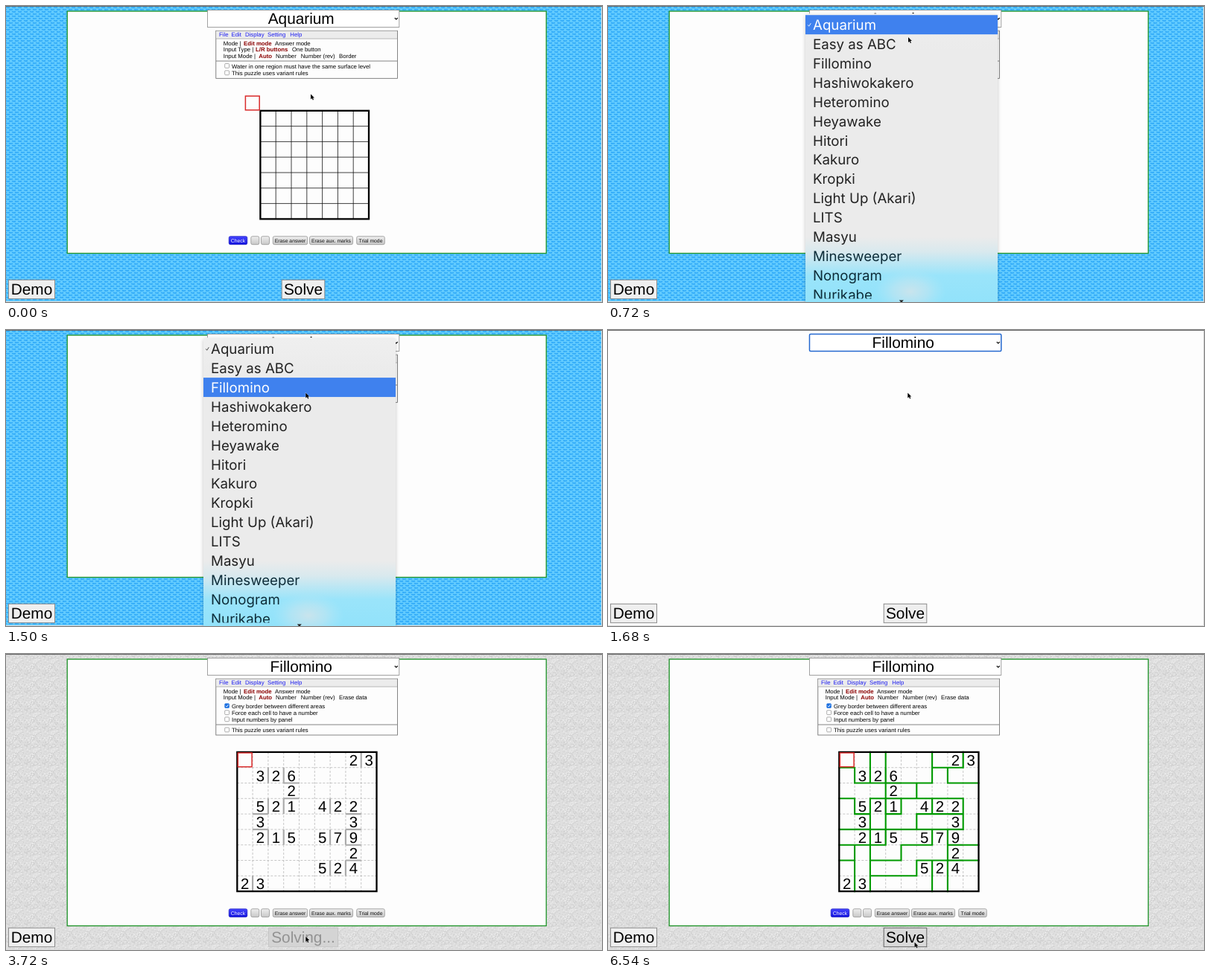
Recreate the animation shown at these times as an HTML page. Size 800x398 px, loop 6.6 s.

```html
<!DOCTYPE html>
<html lang="en">
<head>
<meta charset="utf-8">
<title>Puzzle solver demo</title>
<style>
  html, body { margin: 0; width: 100%; height: 100%; overflow: hidden; background: #fdfdfd; }
  svg { display: block; width: 800px; height: 398px; }
  text { font-family: "Liberation Sans", Arial, sans-serif; text-rendering: geometricPrecision; white-space: pre; }
  .big { font-size: 20.8px; text-anchor: middle; }
  .small { font-size: 7.8px; }
  .link { fill: #1a1af0; }
  .on { fill: #8b0000; font-weight: bold; }
  .tool { font-size: 6.8px; text-anchor: middle; }
  .digit { font-size: 20.4px; text-anchor: middle; }
  .item { font: 18.7px Inter, Roboto, sans-serif; }
</style>
</head>
<body>
<svg id="stage" viewBox="0 0 800 398" xmlns="http://www.w3.org/2000/svg"></svg>
<script>
const LOOP = 6600, CELL = 20.8, ROW = 25.95, LIST_TOP = 12.2;
const OPEN = 480, CHOSEN = 1620, LOADED = 1860, PRESS = 2220, DEMO = 2340, SOLVING = 3660, SOLVED = 4860;
const PUZZLES = ['Aquarium', 'Easy as ABC', 'Fillomino', 'Hashiwokakero', 'Heteromino', 'Heyawake', 'Hitori',
  'Kakuro', 'Kropki', 'Light Up (Akari)', 'LITS', 'Masyu', 'Minesweeper', 'Nonogram', 'Nurikabe'];
const CLUES = ['.......23', '.326.....', '...2.....', '.521.422.', '.3.....3.', '.215.579.', '.......2.', '.....524.', '23.......'];
const REGIONS = ['AABCCCDDE', 'FABCCCGEE', 'FFFHHGGGG', 'IFJKLLMMG', 'IIJLLNNNG', 'OOPQQQRGG', 'TUQQRRRVV', 'WURRRXYZZ', 'WUXXXXYZZ'];

// Pointer stops: time, x, y
const POINTER = [
  [0, 409, 118.5], [420, 404, 19], [570, 404, 21], [720, 403, 42], [1380, 402.3, 84.5], [1740, 402.3, 84.5],
  [2180, 44.5, 385.5], [2800, 44.5, 385.5], [3240, 402.3, 380], [4900, 402.3, 380], [5460, 464, 336],
  [6140, 450, 277], [6270, 450, 277], [6530, 411.5, 387.5]
];

const attrs = o => Object.entries(o).map(([k, v]) => ` ${k}="${v}"`).join('');
const el = (tag, o, inner = '') => `<${tag}${attrs(o)}>${inner}</${tag}>`;
const rect = (x, y, width, height, fill, more = {}) => el('rect', { x, y, width, height, fill, ...more });
const path = (d, stroke, width, more = {}) => el('path', { d, stroke, 'stroke-width': width, fill: 'none', ...more });
const text = (cls, x, y, s, more = {}) => el('text', { class: cls, x, y, ...more }, s);
const group = (id, inner, more = {}) => el('g', { id, ...more }, inner);

function speckles() {
  let seed = 7, out = '';
  const rnd = n => (seed = seed * 16807 % 2147483647) % (n * 10) / 10;
  for (let i = 0; i < 150; i++) {
    out += rect(rnd(23), rnd(23), 1.6, 1, ['#cbcbcb', '#d3d3d3', '#f0f0f0'][i % 3]);
  }
  return out;
}

const defs = `<defs>
  <pattern id="waves" width="8" height="6" patternUnits="userSpaceOnUse">${
    rect(0, 0, 8, 6, '#62cbff') + path('M0 1.5q2.5 1 5 0M4 4.5q2.5 1 5 0M-4 4.5q2.5 1 5 0', '#2ca8f8', 1.5)}</pattern>
  <pattern id="stone" width="24" height="24" patternUnits="userSpaceOnUse">${rect(0, 0, 24, 24, '#dfdfdf') + speckles()}</pattern>
  <linearGradient id="glass" x1="0" y1="0" x2="0" y2="1">
    <stop offset="0" stop-color="#efefef"/><stop offset=".12" stop-color="#ebebeb"/><stop offset=".75" stop-color="#ebebeb"/>
    <stop offset=".8" stop-color="#d9e9ee"/><stop offset=".88" stop-color="#9ae4fa"/><stop offset="1" stop-color="#8fe2fb"/>
  </linearGradient>
  <radialGradient id="haze"><stop offset="0" stop-color="#d2e4ea" stop-opacity=".85"/><stop offset=".5" stop-color="#cbe5ee" stop-opacity=".5"/><stop offset="1" stop-color="#b5e8f7" stop-opacity="0"/></radialGradient>
  <linearGradient id="grey" x1="0" y1="0" x2="0" y2="1"><stop offset="0" stop-color="#eee"/><stop offset="1" stop-color="#c8c8c8"/></linearGradient>
  <linearGradient id="blue" x1="0" y1="0" x2="0" y2="1"><stop offset="0" stop-color="#4646ff"/><stop offset="1" stop-color="#0d0ddc"/></linearGradient>
  <filter id="shade" x="-10%" y="-10%" width="120%" height="120%"><feDropShadow dx="0" dy="2" stdDeviation="2.5" flood-opacity=".22"/></filter>
  <clipPath id="items"><rect x="265" y="10" width="258" height="383.5"/></clipPath>
</defs>`;

const board = (bottom, fill) => rect(0, 1, 800, 397, fill) +
  rect(82.2, 7, 643, bottom - 7.5, '#fdfdfd', { stroke: '#1c9226', 'stroke-width': 1.3 });

const row = (y, items) => items.map(([x, s, cls = '']) => text('small ' + cls, x, y, s)).join('');

const check = (y, label, on) =>
  rect(293.7, y - 6, 5.8, 5.8, on ? '#1a6fe0' : '#fff', { rx: 1, stroke: on ? '#1a6fe0' : '#777', 'stroke-width': .6 }) +
  (on ? path(`M295 ${y - 3}l1.3 1.4 2.1-3`, '#fff', .9) : '') + text('small', 303, y, label);

const panel = (bottom, separator, inner) =>
  rect(281.8, 33.3, 243.6, bottom - 33.5, '#fdfdfd', { stroke: '#666', 'stroke-width': .8 }) +
  rect(282.2, 33.7, 242.8, 10, '#ececec') + path('M282 44H525', '#999', .7) +
  path(`M282 ${separator}H525`, '#777', .9) +
  row(41.3, [[286, 'File'], [302.5, 'Edit'], [321, 'Display'], [351, 'Setting'], [381.3, 'Help']].map(i => [...i, 'link'])) +
  row(53, [[291.8, 'Mode |'], [319, 'Edit mode', 'on'], [361, 'Answer mode']]) + inner;

const inputMode = (y, last) => row(y, [[291.8, 'Input Mode |'], [339.3, 'Auto', 'on'], [362, 'Number'], [395.7, 'Number (rev)'], [447, last]]);

function tools(bottom) {
  const y = bottom - 23.3;
  const button = (x, w, s, fill = 'url(#grey)', color = '#111') =>
    rect(x, y, w, 11, fill, { rx: 2, stroke: color === '#fff' ? '#2222c0' : '#888', 'stroke-width': .7 }) +
    text('tool', x + w / 2, y + 7.8, s, { fill: color });
  return button(299.2, 24.6, 'Check', 'url(#blue)', '#fff') + button(328.8, 11, '') + button(342.5, 11, '') +
    button(358.3, 46.4, 'Erase answer') + button(407.5, 58, 'Erase aux. marks') + button(470.7, 37.6, 'Trial mode');
}

function gridLines(x, y, n) {
  let d = '';
  for (let i = 1; i < n; i++) d += `M${x + i * CELL} ${y}v${n * CELL}M${x} ${y + i * CELL}h${n * CELL}`;
  return d;
}

const frame = (x, y, n) => rect(x, y, n * CELL, n * CELL, 'none', { stroke: '#000', 'stroke-width': 2.3 });
const marker = (x, y) => rect(x, y, 18.8, 18.8, 'none', { stroke: '#d92a2a', 'stroke-width': 1.5 });

// Edges between neighbouring cells that satisfy the rule
function edges(x, y, map, differ) {
  let d = '';
  map.forEach((line, r) => [...line].forEach((a, c) => {
    if (c < 8 && differ(a, line[c + 1])) d += `M${x + (c + 1) * CELL} ${y + r * CELL}v${CELL}`;
    if (r < 8 && differ(a, map[r + 1][c])) d += `M${x + c * CELL} ${y + (r + 1) * CELL}h${CELL}`;
  }));
  return d;
}

function digits(x, y) {
  return CLUES.map((line, r) => [...line].map((s, c) =>
    s === '.' ? '' : text('digit', x + (c + .5) * CELL, y + r * CELL + 17.8, s)).join('')).join('');
}

const dashed = (x, y, n) => path(gridLines(x, y, n), '#b9b9b9', .8, { 'stroke-dasharray': '3 2' });

const aquarium = board(333, 'url(#waves)') +
  panel(97.5, 74, row(61.2, [[291.8, 'Input Type |'], [335, 'L/R buttons', 'on'], [384, 'One button']]) +
    inputMode(69.8, 'Border') + check(83.5, 'Water in one region must have the same surface level') +
    check(92.9, 'This puzzle uses variant rules')) +
  path(gridLines(341.4, 140.8, 7), '#111', .8) + frame(341.4, 140.8, 7) + marker(321.4, 121.1) + tools(333);

const fillominoPanel = panel(109.2, 95, inputMode(61.4, 'Erase data') +
  check(72.7, 'Grey border between different areas', true) + check(81.8, 'Force each cell to have a number') +
  check(90.9, 'Input numbers by panel') + check(105, 'This puzzle uses variant rules'));

const emptyBoard = board(324.5, 'url(#stone)') + fillominoPanel +
  dashed(331, 131.9, 7) + frame(331, 131.9, 7) + marker(332, 133) + tools(324.5);

const GX = 310.3, GY = 131.9;
const demoBoard = board(366, 'url(#stone)') + fillominoPanel + dashed(GX, GY, 9) +
  path(edges(GX, GY, CLUES, (a, b) => a !== '.' && b !== '.' && a !== b), '#aaa', 2.1) +
  group('solution', path(edges(GX, GY, REGIONS, (a, b) => a !== b), '#009a00', 2.1, { 'stroke-linecap': 'square' })) +
  frame(GX, GY, 9) + digits(GX, GY) + marker(GX + 1, GY + 1) + tools(366);

const select = rect(270.5, 5.5, 257.3, 23, '#fff', { id: 'select' }) +
  text('big', 396.2, 24, '', { id: 'chosen' }) + path('M521.8 16l2 2 2-2', '#111', 1.2);

const bigButton = (id, x, w, label) => group(id,
  rect(x, 368.3, w, 25.4, '#efefef', { 'stroke-width': 1 }) + text('big', x + w / 2, 387.7, label));

const menu = rect(265, 10.3, 258, 400, 'url(#glass)', { rx: 3, filter: 'url(#shade)' }) +
  el('ellipse', { cx: 406, cy: 384, rx: 48, ry: 30, fill: 'url(#haze)' }) +
  rect(265, LIST_TOP, 258, ROW, '#3f81ee', { id: 'highlight' }) +
  path('M268.3 25.4l1.4 1.8 2.6-4', '#333', .9, { id: 'tick' }) +
  group('list', PUZZLES.map((s, i) => text('item', 275, LIST_TOP + 19.6 + i * ROW, s)).join(''), { 'clip-path': 'url(#items)' }) +
  el('path', { d: 'M390.8 395.5h6l-3 3.5z', fill: '#222' });

const stage = document.getElementById('stage');
stage.innerHTML = defs + rect(0, 0, 800, 398, '#fdfdfd') +
  group('aquarium', aquarium) + group('empty', emptyBoard) + group('demoBoard', demoBoard) +
  path('M0 .5H800', '#6a6a6a', 1) + path('M799.5 1V397.5H0', '#dcdcdc', 1) + select +
  bigButton('demo', 3.5, 62, 'Demo') + bigButton('solve', 370.2, 57.6, 'Solve') + bigButton('busy', 352.5, 93, 'Solving...') +
  group('menu', menu) +
  group('pointer', el('path', { d: 'M0 0V7L1.7 5.6 2.8 8 4 7.5 2.9 5.1H5Z', fill: '#000', stroke: '#fff', 'stroke-width': .6, 'paint-order': 'stroke' }));

const $ = id => document.getElementById(id);
const set = (node, o) => { for (const k in o) node.setAttribute(k, o[k]); };
const show = (id, on) => set($(id), { display: on ? 'inline' : 'none' });

function pointerAt(t) {
  const i = POINTER.findIndex(p => p[0] > t);
  if (i < 0) return POINTER[POINTER.length - 1].slice(1);
  const [t0, x0, y0] = POINTER[i - 1], [t1, x1, y1] = POINTER[i];
  const u = (t - t0) / (t1 - t0), k = u * u * (3 - 2 * u);
  return [x0 + (x1 - x0) * k, y0 + (y1 - y0) * k];
}

function paintButton(id, left, right, [x, y]) {
  const hover = x > left && x < right && y > 368 && y < 394;
  set($(id).firstChild, { fill: hover ? '#dadada' : '#efefef', stroke: hover ? '#666' : '#8c8c8c' });
}

function draw(t) {
  const p = pointerAt(t), busy = t >= SOLVING && t < SOLVED;
  show('aquarium', t < CHOSEN);
  show('empty', t >= LOADED && t < DEMO);
  show('demoBoard', t >= DEMO);
  show('solution', t >= SOLVED);
  show('menu', t >= OPEN && t < CHOSEN);
  show('solve', !busy);
  show('busy', busy);

  const focused = t >= CHOSEN && t < PRESS;
  set($('select'), { stroke: focused ? '#2468cf' : '#8a8a8a', 'stroke-width': focused ? 1.5 : .8, rx: focused ? 1.5 : 0 });
  $('chosen').textContent = PUZZLES[t < CHOSEN ? 0 : 2];

  // The highlight trails the pointer slightly
  const active = Math.max(0, Math.floor((p[1] - LIST_TOP - 5) / ROW));
  set($('highlight'), { y: LIST_TOP + active * ROW });
  set($('tick'), { stroke: active ? '#333' : '#fff' });
  [...$('list').children].forEach((n, i) => set(n, { fill: i === active ? '#fff' : i > 11 ? '#0d2c38' : '#222' }));

  paintButton('demo', 3, 66, p);
  paintButton('solve', 370, 428, p);
  set($('busy').firstChild, { fill: '#d4d4d4', stroke: '#c6c6c6' });
  set($('busy').lastChild, { fill: '#929292' });
  set($('pointer'), { transform: `translate(${p[0]} ${p[1]})` });
}

const start = performance.now();
function tick() {
  draw((performance.now() - start) % LOOP);
  requestAnimationFrame(tick);
}
tick();
</script>
</body>
</html>
```
